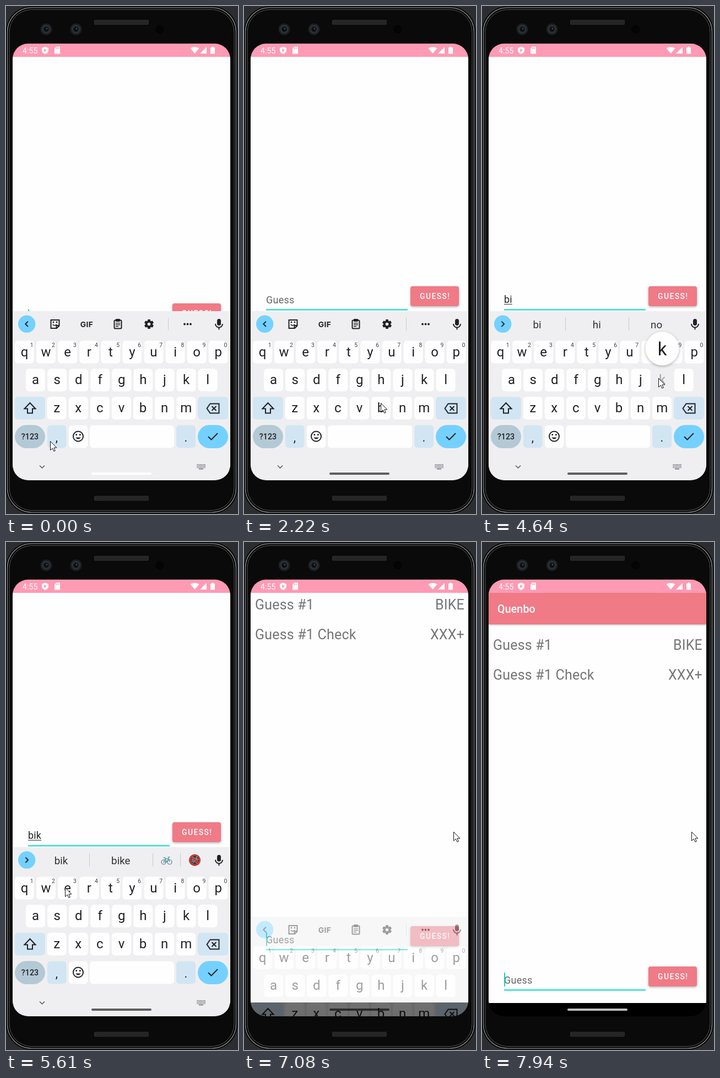
Recreate the animation shown at these times as an HTML page with a canvas. Size 421 px wide and 919 px high, loop 8000 ms.

```html
<!DOCTYPE html>
<html lang="en">
<head>
<meta charset="utf-8">
<title>Word guessing app</title>
<style>
html, body { margin: 0; width: 100%; height: 100%; overflow: hidden; background: #2b2d30; }
canvas { display: block; }
</style>
</head>
<body>
<canvas id="stage" width="421" height="919"></canvas>
<script>
const LOOP = 8000, PAN = 261;
const stage = document.getElementById('stage').getContext('2d');
const layer = document.createElement('canvas');
layer.width = 421;
layer.height = 919;
const keys = layer.getContext('2d');
let c = stage;

const INK = '#202124', TEAL = '#03dac5', PINK = '#f07a86', BLUE = '#74d1ff', PALE = '#d2e5f3';
const clamp = v => Math.max(0, Math.min(1, v));
const span = (t, a, b) => clamp((t - a) / (b - a));
const ease = k => k * k * (3 - 2 * k);

// [time, x, y] of the pointer tip
const POINTER = [
  [0, 81, 787], [1230, 81, 787], [1810, 249, 718], [2530, 249, 718],
  [2950, 333, 641], [3150, 321, 637], [3320, 321, 637], [3340, 311, 640],
  [3800, 311, 640], [4500, 321, 673], [4900, 321, 673], [5600, 108, 625],
  [5860, 108, 625], [6060, 214, 524], [6280, 214, 524], [6500, 381, 524], [LOOP, 381, 524]
];
const BLINK_ON = [[0, 280], [560, 1270], [1810, 2220], [2530, 3030], [3770, 4280],
  [4790, 5290], [5910, 6370], [6960, 7440], [7920, LOOP]];
const PRESSES = [['b', 2370, 2530], ['i', 3620, 3770], ['k', 4640, 4790], ['e', 5760, 5910]];
const SUGGEST = { b: ['b', 'but', 'be'], bi: ['bi', 'hi', 'no'], bik: ['bik', 'bike'], bike: ['bike', 'hike'] };

function text(s, x, y, size, color, { weight = 400, align = 'left', gap = 0, font = 'Roboto' } = {}) {
  c.font = `${weight} ${size}px ${font}, sans-serif`;
  c.textAlign = align;
  c.letterSpacing = gap + 'px';
  c.fillStyle = color;
  c.fillText(s, x, y);
}
function rect(x, y, w, h, color) {
  c.fillStyle = color;
  c.fillRect(x, y, w, h);
}
function box(x, y, w, h, r, color) {
  c.beginPath();
  c.roundRect(x, y, w, h, r);
  c.fillStyle = color;
  c.fill();
}
function ring(x, y, w, h, r, color, width) {
  c.beginPath();
  c.roundRect(x, y, w, h, r);
  c.strokeStyle = color;
  c.lineWidth = width;
  c.stroke();
}
function disc(x, y, r, color) {
  c.beginPath();
  c.arc(x, y, r, 0, Math.PI * 2);
  c.fillStyle = color;
  c.fill();
}
function circle(x, y, r, color, width) {
  c.beginPath();
  c.arc(x, y, r, 0, Math.PI * 2);
  c.strokeStyle = color;
  c.lineWidth = width;
  c.stroke();
}
function shape(d, x, y, fill, stroke, width = 2) {
  const p = new Path2D(d);
  c.save();
  c.translate(x, y);
  if (fill) { c.fillStyle = fill; c.fill(p); }
  if (stroke) { c.strokeStyle = stroke; c.lineWidth = width; c.stroke(p); }
  c.restore();
}
function shadow(color, blur, dy) {
  c.shadowColor = color;
  c.shadowBlur = blur;
  c.shadowOffsetY = dy;
}
const noShadow = () => shadow('transparent', 0, 0);

function speaker(y) {
  box(160, y, 99, 9, 2, '#2b2b2b');
  for (let x = 162; x < 257; x += 2)
    for (let j = 1; j < 8; j += 2) rect(x + (j % 4 === 1 ? 0 : 1), y + j, 1, 1, '#141414');
}
function lens(x) {
  disc(x, 42, 10.5, '#1d2024');
  circle(x, 42, 6.5, '#33383e', 1.5);
  disc(x, 42, 4, '#0c0f13');
  disc(x + 1, 41, 1.3, '#4b535c');
}
function phone() {
  rect(0, 0, 421, 919, '#2b2d30');
  box(0, 0.5, 420, 918, 46, '#050505');
  ring(2.5, 3, 415, 913, 44, '#77797b', 1.5);
  ring(6, 6.5, 408, 906, 41, '#5c5d5e', 1);
  box(7, 7.5, 406, 904, 40, '#0a0a0a');
  speaker(25);
  speaker(886);
  lens(73);
  lens(127);
  disc(279, 42, 7.5, '#040404');
}

function statusBar() {
  rect(12, 68, 395, 24, '#ff9ab4');
  text('4:55', 30, 86, 14, '#fff', { gap: 0.1 });
  shape('M0-6.5L6-4V0C6 3.5 3 6 0 7C-3 6-6 3.5-6 0V-4Z', 71, 80, '#fff');
  shape('M-1.8-3L3 0L-1.8 3Z', 71, 80, '#ff9ab4');
  shape('M-1.5-6.5H5V6.5H-5V-3Z', 93, 80, '#fff');
  for (const x of [91, 93, 95]) rect(x, 75, 1, 3, '#ff9ab4');
  shape('M0 6L-8-3.5C-4-7 4-7 8-3.5Z', 342.5, 80, '#fff');
  shape('M6-6V6H-6Z', 358, 80, '#fff');
  shape('M-1.5-6.5H1.5V-5H4V6.5H-4V-5H-1.5Z', 375, 80, '#fff');
}

function typed(t) {
  return t >= 6960 ? '' : PRESSES.filter(p => t >= p[2]).map(p => p[0]).join('');
}

function field(t) {
  const word = typed(t);
  let w = 0;
  if (word) {
    text(word, 40, 798, 18, '#212121', { gap: 0.15 });
    w = c.measureText(word).width;
    rect(40, 800, w, 1, '#333');
  } else {
    text('Guess', 40, 799, 18, '#666', { gap: 0.25 });
  }
  rect(40, 809.5, 257, 2, TEAL);
  if (BLINK_ON.some(([a, b]) => t >= a && t < b)) rect(40 + w, 779, 2, 25, TEAL);
}

function guessButton(t) {
  shadow('rgba(0,0,0,.3)', 4, 1.5);
  box(302, 768, 88, 36, 4, PINK);
  noShadow();
  const glow = 0.2 * span(t, 6900, 7000) * (1 - span(t, 7230, 7480));
  box(302, 768, 88, 36, 4, `rgba(255,255,255,${glow})`);
  text('GUESS!', 319, 791, 13.8, '#fff', { weight: 500, gap: 1.5 });
}

function app(t, shift) {
  rect(12, 92, 395, 742, '#fefefe');
  rect(12, 833 + (shift < -0.5 ? 0 : 1), 395, 25, '#000');
  c.save();
  c.beginPath();
  c.rect(12, 92, 395, 742);
  c.clip();
  c.translate(0, Math.round(shift));
  shadow('rgba(0,0,0,.3)', 3, 1);
  rect(12, 60, 395, 89, PINK);
  noShadow();
  text('Quenbo', 28, 128, 19.5, '#fff', { weight: 500, gap: 0.2 });
  if (t >= 6960) {
    const gray = '#757575', left = { gap: 0.2 }, right = { gap: 0.2, align: 'right' };
    text('Guess #1', 20, 195, 25, gray, left);
    text('BIKE', 400, 195, 25, gray, right);
    text('Guess #1 Check', 20, 249, 25, gray, left);
    text('XXX+', 400, 249, 25, gray, right);
  }
  field(t);
  guessButton(t);
  c.restore();
}

function keyAt(ch) {
  const rows = [['qwertyuiop', 33.5, 626], ['asdfghjkl', 53.5, 676.7], ['zxcvbnm', 92.2, 727.4]];
  for (const [s, x, y] of rows)
    if (s.includes(ch)) return [x + s.indexOf(ch) * 39.08, y];
}
function key(x, y, w, color, r = 6) {
  box(x, y, w, 41, r, color);
}

function gear(x, y) {
  c.save();
  c.translate(x, y);
  for (let i = 0; i < 6; i++) {
    c.rotate(Math.PI / 3);
    box(-2.5, -8.5, 5, 6, 1, INK);
  }
  c.restore();
  disc(x, y, 6.3, INK);
  disc(x, y, 2.8, '#efeff1');
}
function mic() {
  box(383, 566, 7, 12, 3.5, INK);
  shape('M-6.5 0A6.5 6.5 0 0 0 6.5 0M0 6.5V10.5', 386.5, 575, null, INK, 2);
}
function bike(x, y, color, frame) {
  circle(x - 5.5, y + 3, 4, color, 1.2);
  circle(x + 5.5, y + 3, 4, color, 1.2);
  shape('M-5.5 3L-2.5-3H3.5L0 3Z M5.5 3L3-6H6 M0 3L-3.5-5 M-6-5H-2', x, y, null, frame, 1.4);
}
function toolIcons() {
  shape('M-7-7.5H7.5V3L3 7.5H-7.5V-7.5Z M7 2.5H2.5V7', 89, 575.5, null, INK, 2);
  disc(86, 572, 1.4, INK);
  disc(92, 572, 1.4, INK);
  shape('M-4 1Q-1 5 3 1', 89, 575, null, INK, 1.6);
  text('GIF', 146.5, 580.5, 13.8, INK, { weight: 700, align: 'center', gap: 0.4, font: 'Inter' });
  ring(196.5, 568.5, 13, 15, 1.5, INK, 2);
  box(199, 566, 8, 5, 1, INK);
  for (const y of [573, 576, 579]) rect(199, y, y > 578 ? 5 : 8, 1.4, INK);
  gear(259.5, 575.5);
  rect(294, 564, 1, 23, '#c9cacd');
  for (const x of [324, 329.5, 335]) disc(x, 575.5, 1.9, INK);
}
function suggestions(word) {
  const list = SUGGEST[word];
  list.forEach((s, i) => text(s, 100 + i * 108.3, 583, 18.8, '#303134', { align: 'center' }));
  rect(151, 563, 1, 24, '#c9cacd');
  rect(266, 563, 1, 24, '#c9cacd');
  if (list.length > 2) return;
  rect(316, 563, 1, 24, '#c9cacd');
  bike(291.5, 576, '#68747c', '#5ea7ae');
  disc(342.5, 575.5, 10.5, '#35383b');
  bike(342.5, 575, '#8b9093', '#8b9093');
  circle(342.5, 575.5, 9, '#d9382f', 2.6);
  shape('M-6.5-6.5L6.5 6.5', 342.5, 575.5, null, '#d9382f', 2.6);
}

function letters(down) {
  for (const ch of 'qwertyuiopasdfghjklzxcvbnm') {
    const [x, y] = keyAt(ch), held = ch === down;
    if (!held) key(x - 17.5, y - 20.5, 35, '#fefefe');
    text(ch, x, Math.floor(y) + 8, 24, held ? '#a6a7aa' : INK, { align: 'center' });
  }
  for (let i = 0; i < 10; i++)
    text((i + 1) % 10, 46.8 + i * 39.08, 617, 10.5, '#3c4043', { align: 'center' });
}

function specialKeys() {
  key(16, 707, 55, PALE);
  key(348, 707, 55, PALE);
  shape('M0-10L10 0.5H4.5V8.5H-4.5V0.5H-10Z', 43.5, 728, null, INK, 2);
  shape('M-11 0L-5-8.5H11V8.5H-5Z M-2-4L6 4M6-4L-2 4', 375.5, 728, null, INK, 2);
  box(16, 758, 55, 42, 21, '#b3c9d5');
  text('?123', 43.5, 784, 14.3, INK, { weight: 500, align: 'center' });
  key(75, 758.5, 34.5, PALE);
  text(',', 92, 788, 22, INK, { align: 'center' });
  key(114, 758.5, 34.5, '#fefefe');
  circle(131, 778.5, 9, INK, 2);
  disc(127.7, 775.5, 1.5, INK);
  disc(134.3, 775.5, 1.5, INK);
  shape('M-4.8 2Q0 8 4.8 2Z', 131, 778.5, INK);
  key(152, 758.5, 153, '#fefefe');
  key(309, 758.5, 35, PALE);
  text('.', 326.3, 788, 22, INK, { align: 'center' });
  box(348, 758, 55, 42, 21, BLUE);
  shape('M-8.5 0L-3 5.5L8.5-6', 375.5, 779, null, INK, 2);
  shape('M-4.5-2.3L0 2.3L4.5-2.3', 65.5, 833.5, null, '#5f6368', 1.6);
  for (let i = 0; i < 7; i++)
    for (let j = 0; j < 3; j++) rect(346.5 + i * 2.3, 829 + j * 2.6, 1.4, 1.5, '#5f6368');
  rect(350, 836.8, 8, 1.4, '#5f6368');
}

function keyboard(t) {
  c = keys;
  c.clearRect(0, 0, 421, 919);
  rect(12, 552, 395, 306, '#efeff1');
  const word = typed(t);
  const press = PRESSES.find(p => t >= p[1] && t < p[2]);
  disc(37.7, 575.3, 15.7, BLUE);
  shape(word ? 'M-2.3-4.7L2.4 0L-2.3 4.7' : 'M2.3-4.7L-2.4 0L2.3 4.7', 37.7, 575.3, null, INK, 1.9);
  if (word) suggestions(word);
  else toolIcons();
  mic();
  letters(press && press[0]);
  specialKeys();
  if (press) {
    const [x, y] = keyAt(press[0]);
    shadow('rgba(0,0,0,.3)', 5, 1.5);
    disc(x, y - 57, 30.5, '#fefefe');
    noShadow();
    text(press[0], x, y - 44.5, 33, INK, { align: 'center' });
  }
  c = stage;
}

function navHandle(t) {
  const closing = t > 7000;
  const light = closing ? span(t, 7260, 7600) : 1 - 0.35 * span(t, 300, 560) - 0.65 * span(t, 1200, 1500);
  const v = Math.round(255 * light);
  const a = 0.6 + (closing ? 0.15 : 0.4) * light;
  box(155, 844, 109, 4, 2, `rgba(${v},${v},${v},${a})`);
}

function pointer(t) {
  const i = Math.max(1, POINTER.findIndex(p => p[0] > t));
  const [t0, x0, y0] = POINTER[i - 1], [t1, x1, y1] = POINTER[i];
  const k = ease(span(t, t0, t1));
  const x = Math.round(x0 + (x1 - x0) * k), y = Math.round(y0 + (y1 - y0) * k);
  shape('M0 0V16L3.8 12.6L6.3 18L8.8 17L6.4 11.6H11.3Z', x - 0.5, y + 0.5, '#fff', '#111', 1);
}

function draw(t) {
  const hide = span(t, 6930, 7250);
  const rise = t < 140 ? 31 : 31 * (1 - span(t, 90, 280)) ** 2;
  const shift = t < 6000 ? rise - PAN : -PAN * (1 - hide) ** 2;
  phone();
  c.save();
  c.beginPath();
  c.roundRect(12, 68, 395, 790, 28);
  c.clip();
  app(t, shift);
  statusBar();
  if (hide < 1) {
    keyboard(t);
    c.globalAlpha = (1 - hide) ** 1.3;
    c.drawImage(layer, 0, Math.round(235 * (1 - (1 - hide) ** 1.2)));
    c.globalAlpha = 1;
  }
  navHandle(t);
  c.restore();
  pointer(t);
}

const start = performance.now();
function tick() {
  draw((performance.now() - start) % LOOP);
  requestAnimationFrame(tick);
}
tick();
</script>
</body>
</html>
```
